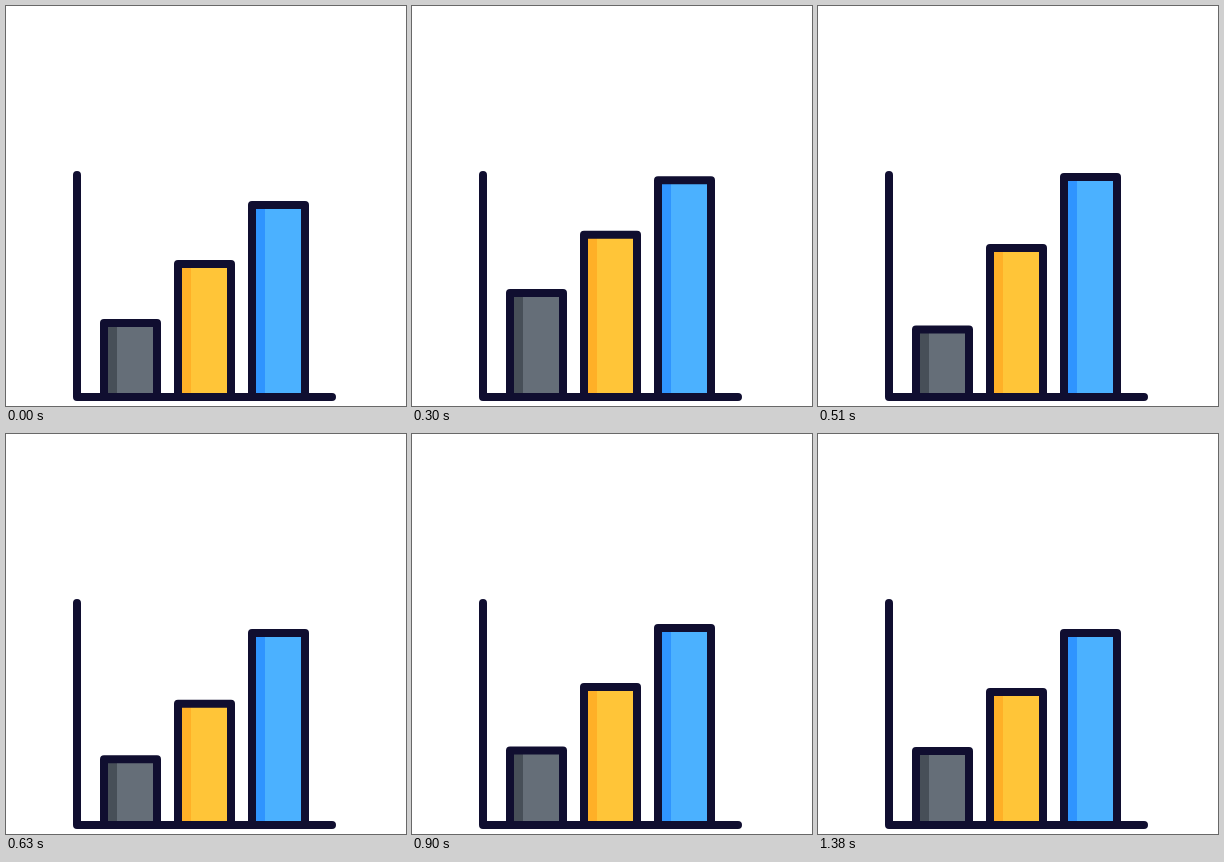
An HTML page that plays this animation: 400x400 px, repeating every 2440 ms.

```html
<!DOCTYPE html>
<html lang="en">
<head>
<meta charset="utf-8">
<title>Bar chart</title>
<style>
  html, body { margin: 0; width: 100%; height: 100%; overflow: hidden; background: #fff; }
  svg { display: block; width: 100vw; height: 100vh; }
  .line { fill: none; stroke: #100e30; stroke-width: 8; stroke-linecap: round; stroke-linejoin: round; }
</style>
</head>
<body>
<svg id="chart" viewBox="0 0 400 400"></svg>
<script>
const LOOP = 2440, STEP = 30, END = 1380, BASE = 391;
const LIFT = 30, RISE = 275, FALL = 205, HALF = 215;

const bars = [
  { x: 98, top: 317, delay: 0, fill: '#656e78', shade: '#474f58' },
  { x: 172, top: 258, delay: 75, fill: '#ffc538', shade: '#ffb027' },
  { x: 246, top: 199, delay: 150, fill: '#4bb1ff', shade: '#2f94ff' }
];

const svg = document.getElementById('chart');

function add(tag, attrs) {
  const el = document.createElementNS('http://www.w3.org/2000/svg', tag);
  for (const key in attrs) el.setAttribute(key, attrs[key]);
  return svg.appendChild(el);
}

for (const bar of bars) {
  bar.parts = [
    add('rect', { x: bar.x, width: 53, fill: bar.fill }),
    add('rect', { x: bar.x, width: 13, fill: bar.shade }),
    add('rect', { x: bar.x, width: 53, class: 'line' })
  ];
}
add('path', { d: 'M71 169V391H326', class: 'line' });

// Extra height: quick rise, accelerating drop, then a damped swing.
function lift(t) {
  if (t <= 0) return 0;
  if (t < RISE) return LIFT * (1 - Math.pow(1 - t / RISE, 2.2));
  t -= RISE;
  if (t < FALL) return LIFT * (1 - Math.pow(t / FALL, 3.05));
  t -= FALL;
  if (t > HALF * 3) return 0;
  return -17 * Math.exp(-0.0034 * t) * Math.sin(Math.PI * t / HALF);
}

function draw(time) {
  const t = Math.floor((time % LOOP) / STEP) * STEP;
  for (const bar of bars) {
    const y = bar.top - (t < END ? lift(t - bar.delay) : 0);
    for (const part of bar.parts) {
      part.setAttribute('y', y.toFixed(2));
      part.setAttribute('height', (BASE - y).toFixed(2));
    }
  }
}

const start = performance.now();
function tick() {
  draw(performance.now() - start);
  requestAnimationFrame(tick);
}
tick();
</script>
</body>
</html>
```
